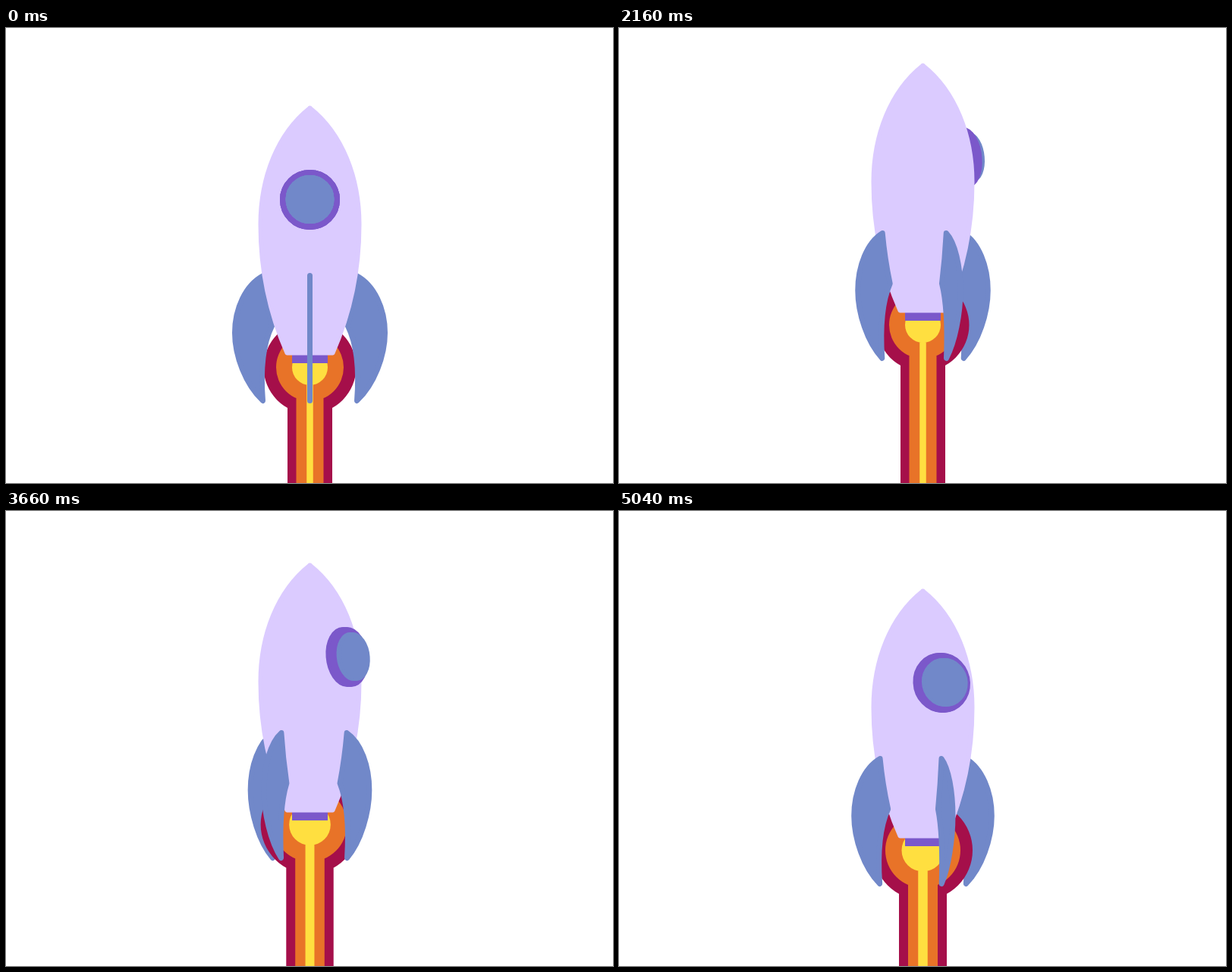
Recreate the animation shown at these times as an HTML page with a canvas. Size 800 by 600 pixels, loop 5.1 s.

```html
<!DOCTYPE html>
<html lang="en">
<head>
<meta charset="utf-8">
<title>Rocket</title>
<style>
html, body { margin: 0; width: 100%; height: 100%; overflow: hidden; background: #fff; }
canvas { display: block; }
</style>
</head>
<body>
<canvas id="stage" width="800" height="600"></canvas>
<script>
const ctx = document.getElementById('stage').getContext('2d');
const LOOP = 5100, STEP = 60, AXIS = 400.5;
const BODY = '#dbcbff', PURPLE = '#7b58ca', BLUE = '#7188c9';
const RED = '#a50f4a', ORANGE = '#e87328', YELLOW = '#ffdf40';

// [ms, nose height]
const HEIGHT = [[0, 102], [780, 80], [1440, 60], [1620, 55], [2160, 46],
  [2560, 44.5], [3060, 49], [4200, 88], [4860, 102], [5100, 102]];
// [ms, spin in degrees, flame cycles]
const SPIN = [[0, 0, 0], [780, -215.5, 5.5], [1440, -399, 10], [2160, -600, 15],
  [3060, -863.5, 21.32], [4200, -1175.5, 29.5], [5040, -1416.5, 35.5], [5100, -1440, 36]];
// [x, ms of entry, width]
const STREAKS = [[143, 100, 8], [623, 420, 9], [221.5, 634, 10], [519, 890, 8],
  [175, 1640, 8], [669, 1790, 8], [186, 2300, 8], [71, 2715, 8], [520, 3150, 8],
  [601, 3860, 8], [106.5, 3924, 8.5], [564, 4450, 8], [250, 4690, 8]];
const STREAK_LEN = 340, STREAK_SPEED = 2.8;

function segment(table, t) {
  let i = 0;
  while (i < table.length - 2 && t >= table[i + 1][0]) i++;
  return i;
}

function linear(table, t, col) {
  const i = segment(table, t), a = table[i], b = table[i + 1];
  return a[col] + (b[col] - a[col]) * (t - a[0]) / (b[0] - a[0]);
}

// Monotone cubic through the table, flat at its turning points
function smooth(table, t) {
  const slope = i => (table[i + 1][1] - table[i][1]) / (table[i + 1][0] - table[i][0]);
  const tangent = i => {
    if (i === 0 || i === table.length - 1) return 0;
    const a = slope(i - 1), b = slope(i);
    return a * b <= 0 ? 0 : 2 * a * b / (a + b);
  };
  const i = segment(table, t), [t0, y0] = table[i], [t1, y1] = table[i + 1];
  const d = t1 - t0, u = (t - t0) / d, v = 1 - u;
  return y0 * v * v * (1 + 2 * u) + y1 * u * u * (3 - 2 * u) +
    d * (tangent(i) * u * v * v - tangent(i + 1) * u * u * v);
}

function paint(color, line) {
  ctx.fillStyle = ctx.strokeStyle = color;
  ctx.fill();
  if (line) {
    ctx.lineWidth = line;
    ctx.stroke();
  }
}

function drawStreak(t, [x, start, width]) {
  const head = (t - start) * STREAK_SPEED, tail = head - STREAK_LEN;
  if (head <= 0 || tail >= 600) return;
  const shade = ctx.createLinearGradient(0, tail, 0, head);
  shade.addColorStop(0, '#6d84a6');
  shade.addColorStop(0.25, '#6c6c96');
  shade.addColorStop(1, '#7d5580');
  ctx.strokeStyle = shade;
  ctx.lineWidth = width;
  ctx.beginPath();
  ctx.moveTo(x, tail + width / 2);
  ctx.lineTo(x, head - width / 2);
  ctx.stroke();
}

function drawFlame(y, p) {
  const layers = [[RED, 61, 4.5, 29.5, 2], [ORANGE, 44.5, 5, 18, 1.5], [YELLOW, 23.5, 4.5, 4.25, 2]];
  for (const [color, r, dr, half, dHalf] of layers) {
    const w = half + dHalf * p;
    ctx.beginPath();
    ctx.arc(AXIS, y, r + dr * p, 0, 7);
    ctx.rect(AXIS - w, y, 2 * w, 600 - y);
    paint(color);
  }
}

function drawFin(y, s) {
  const at = (r, h) => [AXIS + r * s, y + h];
  ctx.beginPath();
  ctx.moveTo(...at(61.5, 224.5));
  ctx.bezierCurveTo(...at(85, 237), ...at(99, 268), ...at(99, 300));
  ctx.bezierCurveTo(...at(99, 330), ...at(85, 368), ...at(62, 389.5));
  ctx.quadraticCurveTo(...at(67, 325), ...at(50, 291));
  ctx.quadraticCurveTo(...at(58, 258), ...at(61.5, 224.5));
  ctx.closePath();
  paint(BLUE, 7);
}

function drawBody(y) {
  ctx.beginPath();
  ctx.moveTo(AXIS, y + 3.5);
  for (const side of [1, -1]) {
    const at = (x, h) => [AXIS + x * side, y + h];
    if (side < 0) ctx.moveTo(AXIS, y + 3.5);
    ctx.bezierCurveTo(...at(43, 37.5), ...at(65, 96), ...at(65, 157));
    ctx.bezierCurveTo(...at(65, 222), ...at(51, 279), ...at(30, 326.5));
    ctx.lineTo(AXIS, y + 326.5);
    ctx.closePath();
  }
  paint(BODY, 6);
}

function drawDisc(y, s, c, color, depths, r, line) {
  for (const d of depths) {
    ctx.save();
    ctx.transform(c || 0.001, 0, 0.1 * s, 1, AXIS + d * s, y);
    ctx.beginPath();
    ctx.arc(0, 0, r, 0, 7);
    ctx.restore();
    paint(color, line);
  }
}

function drawPorthole(y, s, c) {
  const ring = () => drawDisc(y + 124.5, s, c, PURPLE, [59, 62, 65], 35.75, 7.5);
  const glass = () => drawDisc(y + 124, s, c, BLUE, [70, 72, 74.5], 30.5, 3);
  if (c < 0) { glass(); ring(); } else { ring(); glass(); }
}

function draw(t) {
  const y = smooth(HEIGHT, t);
  const spin = linear(SPIN, t, 1) * Math.PI / 180;
  const pulse = (1 - Math.cos(linear(SPIN, t, 2) * 2 * Math.PI)) / 2;
  const s = Math.sin(spin), c = Math.cos(spin);
  const fins = [0, 1, 2, 3].map(k => {
    const a = spin + k * Math.PI / 2;
    return { s: Math.sin(a), c: Math.cos(a) };
  }).sort((a, b) => a.c - b.c);
  const drawFins = (from, to) => fins.forEach(f => {
    if (f.c >= from && f.c < to) drawFin(y, f.s);
  });

  ctx.fillStyle = '#fff';
  ctx.fillRect(0, 0, 800, 600);
  ctx.lineCap = ctx.lineJoin = 'round';
  STREAKS.forEach(streak => drawStreak(t, streak));

  const facing = c > -0.15;
  drawFins(-2, -0.15);
  if (!facing) drawPorthole(y, s, c);
  drawFlame(y + 345.5, pulse);
  drawFins(-0.15, 0.15);
  ctx.fillStyle = PURPLE;
  ctx.fillRect(AXIS - 23.5, y + 327, 47, 13);
  drawBody(y);
  if (facing) drawPorthole(y, s, c);
  drawFins(0.15, 2);
}

const begin = performance.now();
function tick() {
  const t = (performance.now() - begin) % LOOP;
  draw(Math.floor(t / STEP) * STEP);
  requestAnimationFrame(tick);
}
tick();
</script>
</body>
</html>
```
